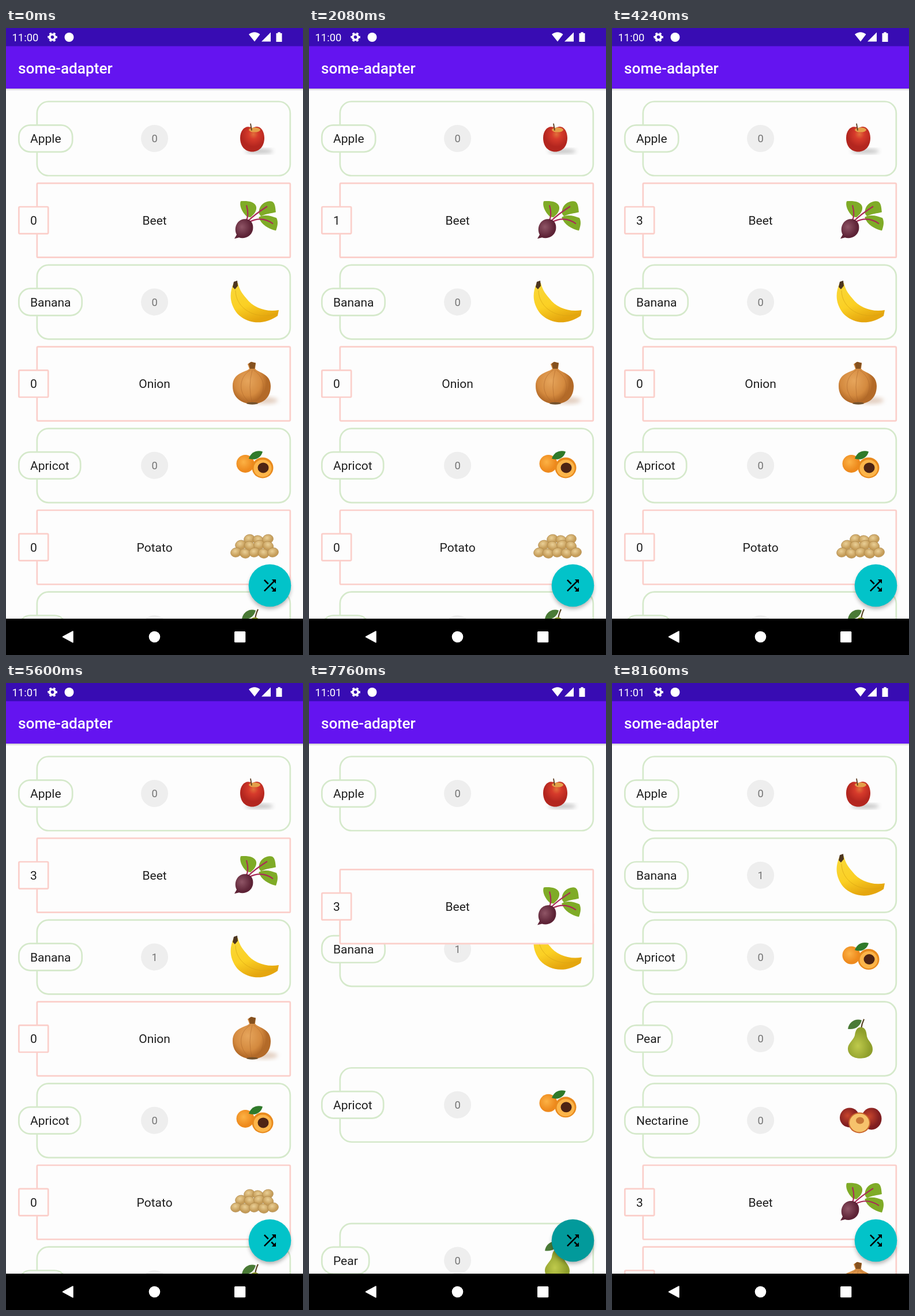
Write an HTML page that moves like this. It is 515x1087 px and loops after 8240 ms.

```html
<!DOCTYPE html>
<html lang="en">
<head>
<meta charset="utf-8">
<title>some-adapter</title>
<style>
html, body { margin: 0; width: 100%; height: 100%; overflow: hidden; background: #fdfdfd; }
svg { display: block; width: 100%; height: 100%; font: 21px Roboto, sans-serif; }
.count { font-size: 18.4px; fill: #757575; text-anchor: middle; }
.mid { text-anchor: middle; }
</style>
</head>
<body>
<svg viewBox="0 0 515 1087">
  <defs>
    <filter id="soft" x="-30%" y="-30%" width="160%" height="160%"><feGaussianBlur stdDeviation="3.5"/></filter>
    <linearGradient id="edge" x2="0" y2="1"><stop stop-color="#000" stop-opacity=".2"/><stop offset="1" stop-opacity="0"/></linearGradient>
    <radialGradient id="red" cx=".55" cy=".3"><stop stop-color="#e2703a"/><stop offset=".4" stop-color="#d63a2b"/><stop offset="1" stop-color="#b3261f"/></radialGradient>
    <radialGradient id="root" cx=".4" cy=".4"><stop stop-color="#8f5566"/><stop offset="1" stop-color="#5d2336"/></radialGradient>
    <linearGradient id="yellow" x2=".4" y2="1"><stop stop-color="#f8d83a"/><stop offset=".6" stop-color="#fbd024"/><stop offset="1" stop-color="#e5a60e"/></linearGradient>
    <radialGradient id="skin" cx=".4" cy=".45"><stop stop-color="#e6a55c"/><stop offset=".7" stop-color="#d48a3f"/><stop offset="1" stop-color="#b36a28"/></radialGradient>
    <radialGradient id="orange" cx=".4" cy=".4"><stop stop-color="#fcb245"/><stop offset="1" stop-color="#ee8a1d"/></radialGradient>
    <radialGradient id="tan" cx=".45" cy=".35"><stop stop-color="#ead097"/><stop offset="1" stop-color="#c59c58"/></radialGradient>
    <radialGradient id="green" cx=".4" cy=".6"><stop stop-color="#bfca4c"/><stop offset="1" stop-color="#8f9f2c"/></radialGradient>
    <radialGradient id="wine" cx=".4" cy=".4"><stop stop-color="#c8452d"/><stop offset="1" stop-color="#7f1d20"/></radialGradient>

    <g id="Apple">
      <ellipse cx="8" cy="22" rx="24" ry="4" fill="#777" opacity=".45" filter="url(#soft)"/>
      <path fill="url(#red)" d="M-4-18C8-26 17-15 17-1 17 14 8 23-4 23S-25 14-25-1C-25-16-14-25-4-18Z"/>
      <ellipse cx="0" cy="-15" rx="10" ry="4" fill="#e4a04a"/>
      <path stroke="#5b3a20" stroke-width="1.8" d="M-7-26-5-14"/>
    </g>
    <g id="Beet">
      <g fill="#7fab27">
        <path d="M-13-6C-22-14-27-26-24-33-14-34 1-33 3-23 4-14-3-9-7-5Z"/>
        <path d="M8-11C6-22 14-32 26-33 36-34 36-22 37-14 29-12 19-11 11-7Z"/>
        <path d="M7-5C16-11 28-8 38-4 42 4 39 12 37 18 24 15 12 8 7-5Z"/>
      </g>
      <path fill="none" stroke="#a92b56" stroke-width="2.2" d="M-15 2Q-9-8-14-26M-12 2Q0-10 22-24M-9 3Q12-8 32 6"/>
      <path fill="url(#root)" d="M-18-2C-5-3-1 8-3 17-6 29-18 33-27 30L-35 32-31 25C-37 13-30-1-18-2Z"/>
    </g>
    <g id="Banana">
      <path fill="url(#yellow)" d="M-36-33C-44-16-44 2-30 20-14 37 14 42 40 24L42 14C20 18-2 10-14-6-23-16-27-24-29-33Z"/>
      <path fill="none" stroke="#d9a514" opacity=".7" d="M-33-20C-33 10 0 33 40 20"/>
      <path fill="#4c3520" d="M-36-35-30-37-29-28-34-22-38-26Z"/>
    </g>
    <g id="Onion">
      <ellipse cx="18" cy="29" rx="22" ry="6" fill="#c9a184" opacity=".5" filter="url(#soft)"/>
      <path fill="url(#skin)" d="M-9-26C-14-20-38-20-38 4-38 26-20 35-4 35 14 35 28 25 28 4 28-18 6-19 1-26L2-36-6-38-12-34Z"/>
      <path fill="none" stroke="#a9642a" opacity=".5" d="M-7-24C-30-10-28 20-6 34M-4-24Q-12 6-4 34M-2-24C22-8 20 20-2 34"/>
      <path fill="#85511f" d="M-10-35-6-38 2-36 0-26-8-26Z"/>
      <ellipse cx="-4" cy="34" rx="10" ry="2" fill="#72512c"/>
    </g>
    <g id="Apricot">
      <circle cx="-16" cy="-3" r="15.5" fill="url(#orange)"/>
      <path fill="#2f7a2a" d="M-10-12C-6-24 5-27 14-24 11-13 1-8-10-12Z"/>
      <ellipse cx="14" cy="4" rx="18.5" ry="18" fill="#e98a1d"/>
      <ellipse cx="14" cy="5" rx="15.5" ry="15" fill="#fcb54a"/>
      <ellipse cx="15" cy="4" rx="9.5" ry="9" fill="#4d2414"/>
    </g>
    <g id="Potato" fill="url(#tan)" stroke="#b08a4c" stroke-width=".7"></g>
    <g id="Pear">
      <path fill="none" stroke="#5a4526" stroke-width="2.2" d="M1-17Q2-26 6-34"/>
      <path fill="#4a7a36" d="M-22-17C-20-30-8-36 2-32-1-21-10-15-22-17Z"/>
      <path fill="url(#green)" d="M0-20C8-20 10-14 11-4 13 4 21 8 21 18 21 30 10 34-1 34-12 34-22 28-22 17-22 8-12 2-10-6-9-14-6-20 0-20Z"/>
    </g>
    <g id="Nectarine">
      <circle cx="-19" cy="-5" r="17" fill="url(#wine)"/>
      <ellipse cx="19" cy="-3" rx="17.5" ry="19" fill="url(#wine)"/>
      <ellipse cx="-2" cy="4" rx="19" ry="18" fill="#c9652c"/>
      <ellipse cx="-2" cy="4" rx="17" ry="16" fill="#f6c26c"/>
      <ellipse cx="-1" cy="0" rx="7" ry="6" fill="#c77536"/>
    </g>
  </defs>

  <rect width="515" height="1087" fill="#fdfdfd"/>
  <g id="list"></g>

  <circle cx="457.5" cy="971" r="36" opacity=".3" filter="url(#soft)"/>
  <circle id="fab" cx="457.5" cy="966.5" r="36.8"/>
  <path transform="translate(441.75 950.75) scale(1.3125)" d="M10.59 9.17L5.41 4 4 5.41l5.17 5.17 1.42-1.41zM14.5 4l2.04 2.04L4 18.59 5.41 20 17.96 7.46 20 9.5V4h-5.5zm.33 9.41l-1.41 1.41 3.13 3.13L14.5 20H20v-5.5l-2.04 2.04-3.13-3.13z"/>

  <rect y="105" width="515" height="4" fill="url(#edge)"/>
  <rect width="515" height="105" fill="#6414f0"/>
  <rect width="515" height="31.5" fill="#380cb3"/>
  <g fill="#fff">
    <text x="21" y="78.5" font-size="26.2" font-weight="500">some-adapter</text>
    <text id="clock" x="10.5" y="22.8" font-size="18.4"></text>
    <g fill="none" stroke="#fff" transform="rotate(-15 80.5 15.8)">
      <circle cx="80.5" cy="15.8" r="4.6" stroke-width="3.6"/>
      <circle cx="80.5" cy="15.8" r="7" stroke-width="2.8" pathLength="12" stroke-dasharray="1"/>
    </g>
    <circle cx="109.5" cy="16" r="8"/>
    <path d="M431 23.5 421 11Q431 3.5 440.5 11ZM443 23.5H459V7.5ZM468.5 9H471.3V7.3H475.7V9H478.5V24H468.5Z"/>
  </g>

  <rect y="1024" width="515" height="63"/>
  <path d="M98.5 1055.5 116 1046V1065Z" fill="#fff" stroke="#fff" stroke-width="1.5" stroke-linejoin="round"/>
  <circle cx="257.5" cy="1055.5" r="9.8" fill="#fff"/>
  <rect x="396" y="1046" width="19.3" height="19.3" rx="1.5" fill="#fff"/>
</svg>

<script>
const LOOP = 8240, STEP = 80, PITCH = 141.7;
const $ = id => document.getElementById(id);
const clamp = x => Math.min(1, Math.max(0, x));
const ease = (t, start, length) => (1 - Math.cos(Math.PI * clamp((t - start) / length))) / 2;
const mix = (a, b, p) => a + (b - a) * p;

const badgeWidth = { Apple: 95.5, Banana: 112, Apricot: 109.5, Pear: 84.5, Nectarine: 131.5 };
const taps = { Beet: [1790, 2990, 3950], Banana: [5310] };

// Heap of potatoes: rows from back to front
$('Potato').innerHTML = [[-14, 3, -9], [-4, 4, -24], [9, 5, -32]].map(([y, n, x0]) =>
  Array.from({ length: n }, (_, i) =>
    `<ellipse cx="${x0 + i * 16}" cy="${y + (i % 2) * 2}" rx="9.5" ry="8" transform="rotate(${i % 2 ? 20 : -15} ${x0 + i * 16} ${y})"/>`
  ).join('')).join('');

function card(name, row, count, opacity) {
  if (opacity <= 0) return '';
  const fruit = name in badgeWidth;
  const [color, radius] = fruit ? ['#d5e9cb', 20] : ['#fbcfca', 1.8];
  const box = (x, y, w, h) =>
    `<rect x="${x}" y="${y}" width="${w}" height="${h}" rx="${radius}" fill="#fdfdfd" stroke="${color}" stroke-width="2.7"/>`;
  const body = fruit
    ? `<circle cx="257.6" cy="65.4" r="23.5" fill="#eee"/><text class="count" x="257.6" y="72.2">${count}</text>`
    : `<text class="mid" x="257.6" y="73.2">${name}</text>`;
  return `<g transform="translate(0 ${126.1 + row * PITCH})" opacity="${opacity}" fill="#1f1f1f">
    ${box(53.8, 1.4, 439, 128.5)}${body}<use href="#${name}" x="431" y="65.5"/>
    ${box(22.3, 42.2, (badgeWidth[name] || 53.5) - 2.6, 46.6)}<text x="42" y="73.2">${fruit ? name : count}</text></g>`;
}

// A changed counter cross-fades the old card into the new one
function item(name, row, t, opacity = 1) {
  const done = (taps[name] || []).filter(tap => t >= tap);
  const p = done.length ? ease(t, done[done.length - 1], 250) : 1;
  return (p < 1 ? card(name, row, done.length - 1, 1 - p) : '') + card(name, row, done.length, opacity * p);
}

function draw(t) {
  const gone = 1 - ease(t, 7590, 120), move = ease(t, 7710, 250), added = ease(t, 7960, 120);
  $('list').innerHTML =
    item('Onion', 3, t, gone) + item('Potato', 5, t, gone) +
    item('Apple', 0, t) +
    item('Banana', mix(2, 1, move), t) +
    item('Apricot', mix(4, 2, move), t) +
    item('Pear', mix(6, 3, move), t) +
    item('Nectarine', 4, t, added) +
    item('Beet', mix(1, 5, move), t) +
    item('Onion', 6, t, added);
  const press = clamp((t - 7440) / 160) * clamp((8160 - t) / 320);
  $('fab').setAttribute('fill', `rgb(2 ${mix(195, 154, press)} ${mix(201, 155, press)})`);
  $('clock').textContent = t < 5360 ? '11:00' : '11:01';
}

let shown = -1;
function tick() {
  const t = Math.floor(performance.now() % LOOP / STEP) * STEP;
  if (t !== shown) draw(shown = t);
  requestAnimationFrame(tick);
}
tick();
</script>
</body>
</html>
```
